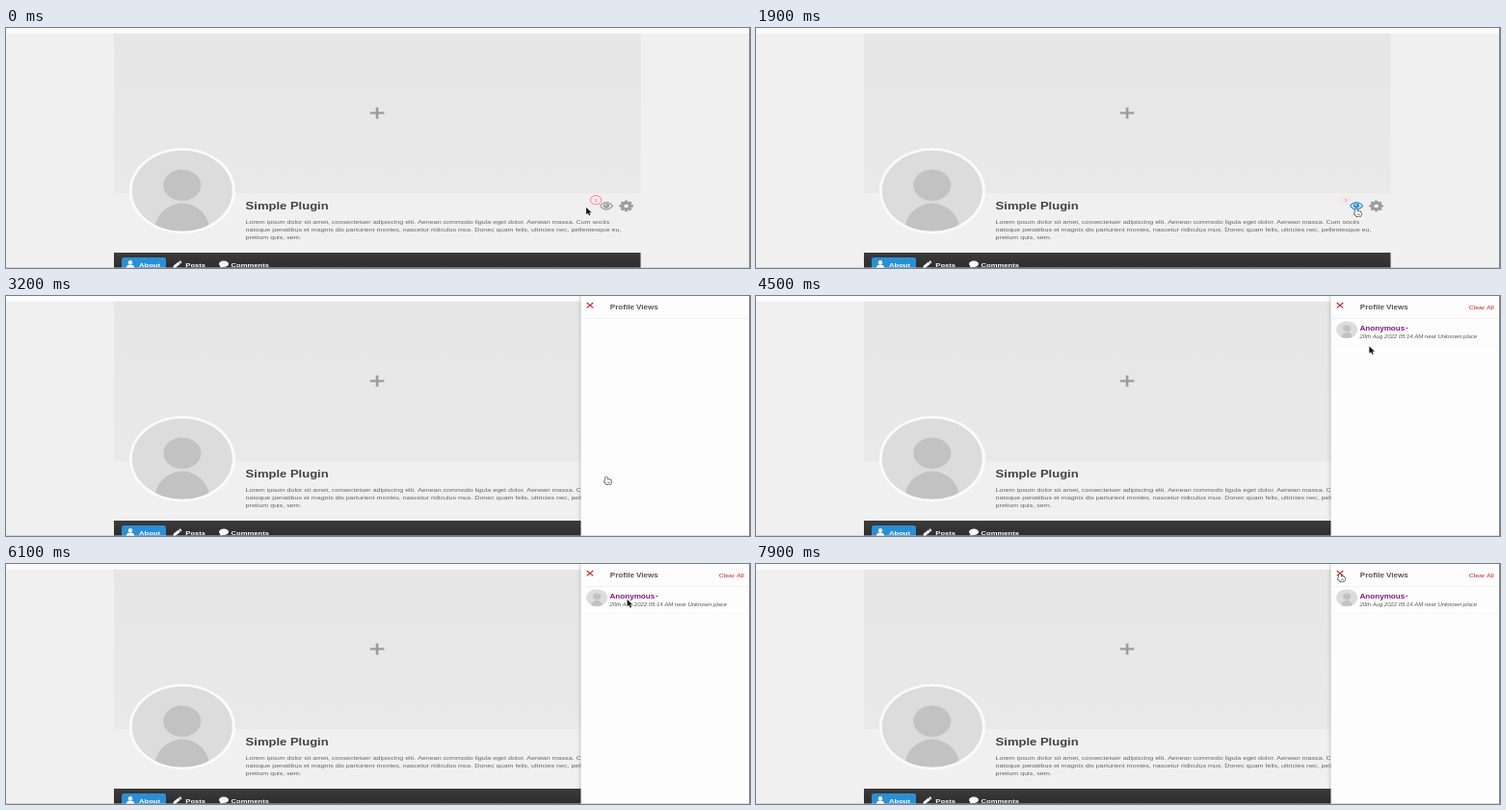
An HTML page with a canvas for the animation above (8000 ms loop, 772 by 250 pixels).

```html
<!DOCTYPE html>
<html lang="en">
<head>
<meta charset="utf-8">
<title>Profile views panel</title>
<style>
  html, body { margin: 0; width: 100%; height: 100%; overflow: hidden; background: #f0f0f0; }
  canvas { display: block; width: 772px; height: 250px; }
</style>
</head>
<body>
<canvas id="stage"></canvas>
<script>
const W = 772, H = 250, LOOP = 8000;
const WIDE = 1.24; // the whole page is shown wider than tall
const BLUE = '#2b8fd6', RED = '#c5202e', GREY = '#9b9b9b', PURPLE = '#7d1a80', PAPER = '#f0f0f0';
const canvas = document.getElementById('stage');
const ctx = canvas.getContext('2d');
const dpr = window.devicePixelRatio || 1;
canvas.width = W * dpr;
canvas.height = H * dpr;

const rest = { x: 602, y: 187 };
const moves = [
  { from: 0, to: 700, x: 623, y: 188 },      // to the eye
  { from: 3850, to: 4200, x: 637, y: 58 },   // into the panel
  { from: 4400, to: 5200, x: 634.5, y: 35 }, // up to the link
  { from: 5950, to: 6200, x: 646.5, y: 37.5 },
  { from: 6900, to: 7750, x: 606, y: 10 }    // to the close cross
];

const clamp = v => Math.max(0, Math.min(1, v));
const swing = p => 0.5 - Math.cos(Math.PI * clamp(p)) / 2;
const easeOut = p => 1 - (1 - clamp(p)) ** 2;

function pointerAt(t) {
  return moves.reduce((pos, m) => {
    const p = easeOut((t - m.from) / (m.to - m.from));
    return { x: pos.x + (m.x - pos.x) * p, y: pos.y + (m.y - pos.y) * p };
  }, rest);
}

function rect(x, y, w, h, color) {
  ctx.fillStyle = color;
  ctx.fillRect(x, y, w, h);
}

function round(x, y, w, h, r, color) {
  ctx.fillStyle = color;
  ctx.beginPath();
  ctx.roundRect(x, y, w, h, r);
  ctx.fill();
}

function oval(x, y, rx, ry, color) {
  ctx.fillStyle = color;
  ctx.beginPath();
  ctx.ellipse(x, y, rx, ry, 0, 0, Math.PI * 2);
  ctx.fill();
}

function at(x, y, draw) {
  ctx.save();
  ctx.translate(x, y);
  draw();
  ctx.restore();
}

function text(str, x, y, size, color, style = '') {
  at(x, y, () => {
    ctx.scale(WIDE, 1);
    ctx.font = `${style} ${size}px "Liberation Sans", Arial, sans-serif`;
    ctx.fillStyle = color;
    ctx.fillText(str, 0, 0);
  });
}

function avatar(x, y, r) {
  at(x, y, () => {
    ctx.scale(r * WIDE, r);
    oval(0, 0, 1, 1, '#dcdcdc');
    ctx.clip();
    oval(0, -0.14, 0.375, 0.385, '#c2c2c2');
    oval(0, 1.02, 0.555, 0.71, '#c2c2c2');
  });
}

function eye(x, y, color) {
  at(x, y, () => {
    ctx.strokeStyle = color;
    ctx.lineWidth = 1.2;
    ctx.beginPath();
    ctx.moveTo(-6.6, 0);
    ctx.quadraticCurveTo(0, -7.6, 6.6, 0);
    ctx.quadraticCurveTo(0, 7.6, -6.6, 0);
    ctx.stroke();
    oval(0, -0.2, 3.1, 2.7, color);
    oval(-0.6, -0.9, 1, 0.8, PAPER);
  });
}

function gear(x, y) {
  at(x, y, () => {
    ctx.scale(WIDE, 1);
    for (let i = 0; i < 8; i++) {
      rect(-1.3, -5.8, 2.6, 3, GREY);
      ctx.rotate(Math.PI / 4);
    }
    oval(0, 0, 4.4, 4.4, GREY);
    oval(0, 0, 1.9, 1.9, PAPER);
  });
}

function badge(t) {
  const fade = 1 - (t % 2000) / 2000;
  rect(606.5, 174.5, 11, 9.5, 'rgba(250,225,228,0.45)');
  ctx.strokeStyle = `rgba(232,70,95,${0.75 * fade})`;
  ctx.lineWidth = 0.8;
  ctx.beginPath();
  ctx.ellipse(612, 179.2, 5.7, 4.7, 0, 0, Math.PI * 2);
  ctx.stroke();
  text('1', 610.8, 180.6, 3.8, '#dc4a5c');
}

function tabs() {
  const bar = ctx.createLinearGradient(0, 234, 0, 250);
  bar.addColorStop(0, '#3c3c3c');
  bar.addColorStop(1, '#2d2d2d');
  rect(112, 234, 546.5, 16, bar);
  round(120, 239, 46, 16, 2.5, BLUE);

  oval(129, 244.3, 2.1, 2.2, '#fff');
  oval(129, 249.6, 4, 3.2, '#fff');
  at(174, 249.4, () => {
    ctx.rotate(-0.68);
    round(0, -1.5, 7.6, 3, [2, 0, 0, 2], '#fff');
    round(8.1, -1.5, 1.7, 3, 0.6, '#fff');
  });
  oval(226, 245.8, 5, 3.2, '#fff');
  round(222.2, 246, 2.6, 3.6, 1, '#fff');

  text('About', 138, 249.2, 6.16, '#fff', 'bold');
  text('Posts', 186.3, 249.2, 6.16, '#fff', 'bold');
  text('Comments', 233.5, 249.2, 6.16, '#fff', 'bold');
}

function page(t, hover) {
  rect(0, 0, W, H, PAPER);
  rect(0, 0, W, 5.6, '#fcfcfc');

  const cover = ctx.createLinearGradient(0, 6, 0, 172);
  cover.addColorStop(0, '#e6e6e6');
  cover.addColorStop(1, '#e9e9e9');
  rect(112, 6, 546.5, 166, cover);
  rect(377.8, 87.4, 14.6, 2.2, GREY);
  rect(383.8, 82.7, 2.6, 11.8, GREY);

  oval(183, 169.6, 55, 44.6, '#fbfbfb');
  avatar(182.8, 169.6, 42);

  text('Simple Plugin', 248.6, 189.2, 10.5, '#444', 'bold');
  [
    'Lorem ipsum dolor sit amet, consectetuer adipiscing elit. Aenean commodo ligula eget dolor. Aenean massa. Cum sociis',
    'natoque penatibus et magnis dis parturient montes, nascetur ridiculus mus. Donec quam felis, ultricies nec, pellentesque eu,',
    'pretium quis, sem.'
  ].forEach((line, i) => text(line, 248.6, 203.9 + i * 8, 5.72, '#666'));

  if (t < 2800) badge(t);
  eye(623, 185.3, hover ? BLUE : GREY);
  gear(643.6, 185.4);
  tabs();
}

function cross(x, y) {
  ctx.strokeStyle = RED;
  ctx.lineWidth = 1.1;
  ctx.beginPath();
  for (const side of [-1, 1]) {
    ctx.moveTo(x - 3.3 * side, y - 2.7);
    ctx.lineTo(x + 3.3 * side, y + 2.7);
  }
  ctx.stroke();
}

function panel(t, hover) {
  const x = W - 175.5 * swing((t - 2840) / 360);
  if (x >= W) return;
  at(x, 0, () => {
    ctx.shadowColor = 'rgba(0,0,0,0.4)';
    ctx.shadowBlur = 5 * dpr;
    rect(0, -10, 190, H + 20, '#fdfdfd');
    ctx.shadowColor = 'transparent';
    rect(0, 23, 176, 0.8, '#f1f1f1');
    cross(9.5, 9.7);
    text('Profile Views', 30.3, 13.8, 6.5, '#555', 'bold');
    if (t < 3900) return;

    const link = hover ? BLUE : PURPLE;
    text('Clear All', 143.2, 13.6, 5.6, RED);
    avatar(16.6, 35.1, 8.9);
    text('Anonymous', 29.9, 35.7, 6.56, link, 'bold');
    oval(78.8, 33.4, 0.9, 0.7, link);
    text('20th Aug 2022 05:14 AM near Unknown place', 29.9, 44.2, 4.8, '#555', 'italic');
    rect(0, 51.5, 176, 0.8, '#f3f3f3');
  });
}

// Strokes first, then fills, so that the parts join into one shape
function outlined(shape, fill, line) {
  ctx.strokeStyle = line;
  ctx.lineWidth = 1.3;
  ctx.stroke(shape);
  ctx.fillStyle = fill;
  ctx.fill(shape);
}

function arrow() {
  outlined(new Path2D('M0 0V7L1.8 5.7L3 8.3L4.2 7.8L3.1 5.2H5.4Z'), '#111', '#e8e8e8');
}

function hand() {
  const shape = new Path2D();
  shape.roundRect(-1, 0.3, 1.8, 6, 0.9);
  shape.roundRect(-1, 3.2, 6, 5.2, [0, 1.8, 1.8, 2.4]);
  shape.roundRect(-2.3, 4.3, 2.6, 1.9, 0.9);
  outlined(shape, '#fff', '#333');
  for (let i = 0; i < 3; i++) rect(1.1 + 1.2 * i, 5.4, 0.5, 2, '#666');
}

function draw(t) {
  ctx.setTransform(dpr, 0, 0, dpr, 0, 0);
  const tip = pointerAt(t);
  const onEye = t < 3900 && tip.x > 616;
  const onLink = t >= 5250 && t < 6100;
  const onClose = t > 7000 && tip.x < 611;
  page(t, onEye);
  panel(t, onLink);
  rect(0, 249, W, 1, 'rgba(190,190,190,0.5)');
  rect(771, 0, 1, H, '#8a8a8a');
  at(tip.x, tip.y, onEye || onLink || onClose ? hand : arrow);
}

const start = performance.now();
function tick() {
  draw((performance.now() - start) % LOOP);
  requestAnimationFrame(tick);
}
tick();
</script>
</body>
</html>
```
